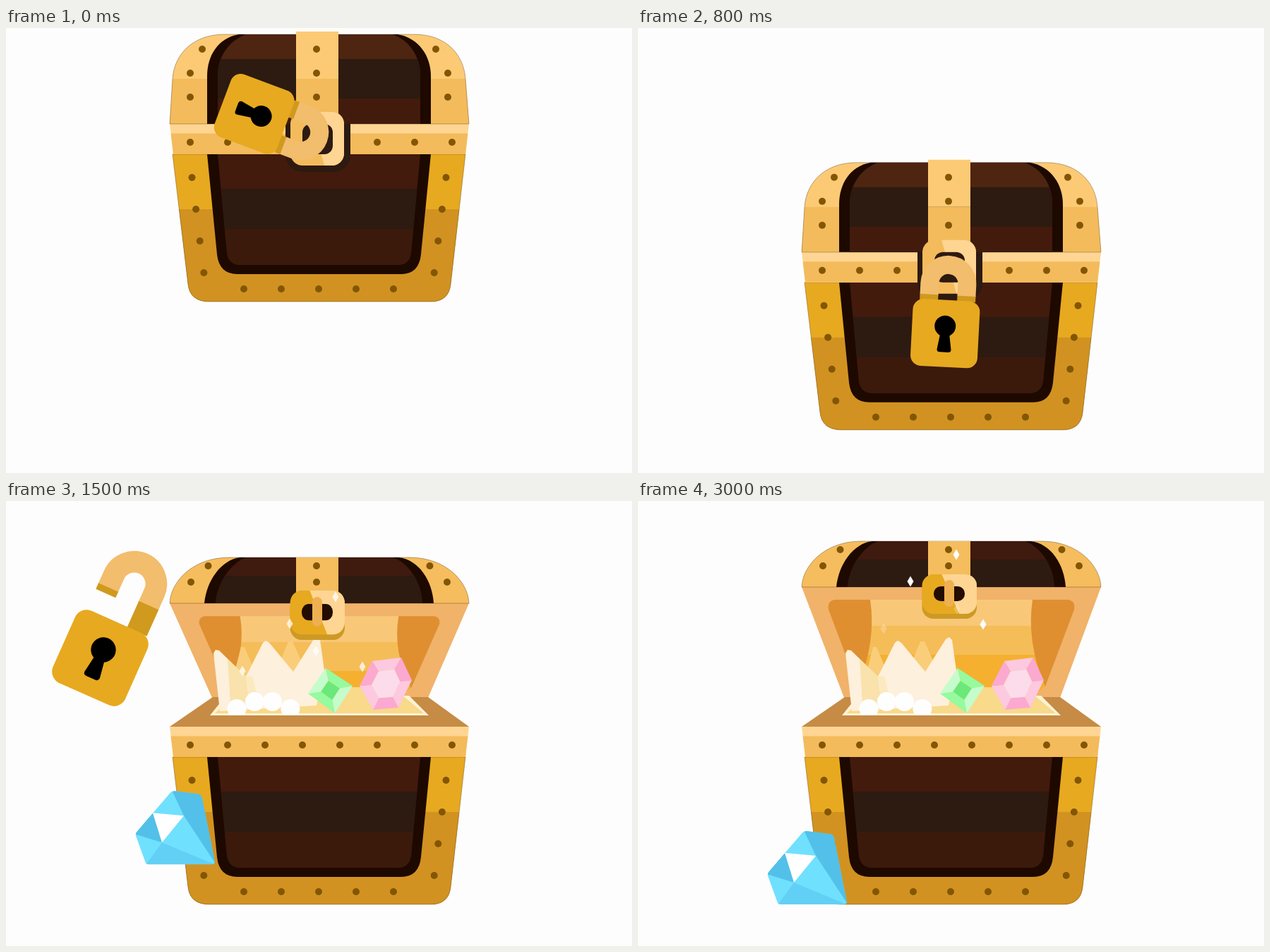
Recreate the animation shown at these times as an HTML page with a canvas. Size 887x631 px, loop 3050 ms.

```html
<!DOCTYPE html>
<html lang="en">
<head>
<meta charset="utf-8">
<title>Treasure chest</title>
<style>
html, body { margin: 0; width: 100%; height: 100%; overflow: hidden; background: #fdfdfd; }
canvas { display: block; }
</style>
</head>
<body>
<canvas id="stage" width="887" height="631"></canvas>
<script>
const ctx = document.getElementById('stage').getContext('2d');
const LOOP = 3050, STEP = 50, OPEN = 1100, FLOOR = 572;
const { PI, sin, cos, exp, min, max } = Math;

const C = {
  pale: '#fed592', light: '#fcca75', mid: '#f3bb5b', gold: '#e7a91f', deep: '#d19221',
  rivet: '#835604', frame: '#1e0900', woodTop: '#4d2511', woodDark: '#2d1a10',
  wood: '#421b0d', woodLow: '#3b1a0c', sky: '#70e0ff', blue: '#52c0e8'
};

// Motion helpers: progress from 0 to 1, and the distance left by an ease-out.
const clamp = v => max(0, min(1, v));
const progress = (t, from, to) => clamp((t - from) / (to - from));
const left = (t, from, to, power) => (1 - progress(t, from, to)) ** power;

const P = d => new Path2D(d);
const shapes = {
  lid: P('M232 0L236-64C238-96 262-127 310-127H578C626-127 649-96 651-64L656 0Z'),
  lidFrame: P('M285 0V-68C285-96 300-122 330-127H555C585-122 602-96 602-68V0Z'),
  lidWood: P('M300 0V-68C300-96 316-118 340-127H548C572-118 587-96 587-68V0Z'),
  rim: P('M232 0H656L651 43H237Z'),
  body: P('M236 43L258 228Q261 252 288 252H602Q627 252 630 228L651 43Z'),
  bodyFrame: P('M285 43L299 185Q302 213 328 213H560Q585 213 588 185L602 43Z'),
  bodyWood: P('M300 43L313 182Q315 200 333 200H554Q572 200 574 182L587 43Z'),
  openLid: P('M232 65C233 35 264 0 316 0H572C624 0 655 35 656 65Z'),
  openFrame: P('M281 65C284 33 305 3 332 0H556C585 3 604 33 606 65Z'),
  openWood: P('M297 65C299 35 320 7 340 0H548C570 7 589 35 590 65Z'),
  cavity: P('M328 278L311 262L329 140H559L577 262L560 278Z'),
  panel: P('M329 140H278Q268 142 270 154L311 263Q338 200 329 140Z'),
  slot: P('M-6 8H6L10 33Q10 37 6 37H-6Q-10 37-10 33Z'),
  diamond: P('M239 468L272 472Q277 473 278 478L296 568Q296 572 292 572H202Q198 572 197 568L184 532Q183 528 186 525L233 470Q235 468 239 468Z')
};

function fill(path, color) {
  ctx.fillStyle = color;
  ctx.fill(path);
}

function edge(path) {
  ctx.strokeStyle = 'rgba(60,35,0,.5)';
  ctx.lineWidth = .7;
  ctx.stroke(path);
}

function round(x, y, w, h, r) {
  const path = new Path2D();
  path.roundRect(x, y, w, h, r);
  return path;
}

const box = (x, y, w, h, color, r = 0) => fill(round(x, y, w, h, r), color);

function dot(x, y, r, color) {
  ctx.fillStyle = color;
  ctx.beginPath();
  ctx.arc(x, y, r, 0, 7);
  ctx.fill();
}

function poly(color, ...pts) {
  ctx.fillStyle = color;
  ctx.beginPath();
  for (let i = 0; i < pts.length; i += 2) ctx.lineTo(pts[i], pts[i + 1]);
  ctx.closePath();
  ctx.fill();
}

function group(draw) {
  ctx.save();
  draw();
  ctx.restore();
}

// Horizontal bands inside a path: top edge and colour pairs.
function bands(path, end, ...list) {
  group(() => {
    ctx.clip(path);
    list.forEach(([y, color]) => box(0, y, 887, end - y, color));
  });
}

const rivet = (x, y) => dot(x, y, 5, C.rivet);

function rivetPair(x, y) {
  rivet(x, y);
  rivet(887 - x, y);
}

function base(rimY, squash) {
  group(() => {
    ctx.translate(0, rimY);
    ctx.scale(1, squash);
    bands(shapes.body, 253, [42, C.gold], [121, C.deep]);
    edge(shapes.body);
    fill(shapes.bodyFrame, C.frame);
    bands(shapes.bodyWood, 201, [42, C.wood], [92, C.woodDark], [149, C.woodLow]);
    bands(shapes.rim, 43, [0, C.pale], [13.5, C.mid]);
    for (let i = 0; i < 4; i++) rivetPair(263.5 + i * 5.6, 76 + i * 45);
    for (let i = 0; i < 8; i++) rivet(261 + i * 53, 26);
    for (let i = 0; i < 5; i++) rivet(337 + i * 53, 234);
  });
}

function closedLid(y) {
  group(() => {
    ctx.translate(0, y);
    bands(shapes.lid, 0, [-127, C.light], [-64, C.mid]);
    edge(shapes.lid);
    fill(shapes.lidFrame, C.frame);
    bands(shapes.lidWood, 0, [-127, C.woodTop], [-92, C.woodDark], [-36, C.wood]);
    box(411, -131, 60, 67, C.light);
    box(411, -64, 60, 50, C.mid);
    for (let i = 0; i < 3; i++) {
      rivetPair(i ? 261 : 278, i * 34 - 106);
      rivet(440, i * 34 - 106);
    }
    box(396, 0, 92, 68, C.woodDark, [0, 0, 24, 24]);
    group(() => {
      ctx.clip(round(403, -17, 76, 76, 17));
      box(400, -20, 85, 85, C.mid);
      poly(C.pale, 430, -18, 482, -18, 482, 62, 452, 62);
    });
    box(420, 0, 43, 43, C.woodDark, 12);
  });
}

function lidInside(bot) {
  poly('#f1b26a', 232, bot, 656, bot, 598, 279, 292, 279);
  const k = max(.01, (259 - bot) / 137), narrow = 1 - (bot - 122) / 1000;
  group(() => {
    ctx.translate(444, 278);
    ctx.scale(narrow, k);
    ctx.translate(-444, -278);
    group(() => {
      ctx.clip(shapes.cavity);
      ctx.translate(0, 278);
      ctx.scale(1, 1 / k);
      ctx.translate(0, bot - 400);
      box(280, 138, 330, 40, '#f8c878');
      box(280, 177, 330, 42, '#f5bd58');
      box(280, 218, 330, 80, '#f5b030');
    });
    fill(shapes.panel, '#df8f30');
    ctx.translate(888, 0);
    ctx.scale(-1, 1);
    fill(shapes.panel, '#df8f30');
  });
}

function openLid(top, bot) {
  group(() => {
    ctx.translate(0, top);
    ctx.scale(1, (bot - top) / 65);
    fill(shapes.openLid, '#f5bd5d');
    edge(shapes.openLid);
    fill(shapes.openFrame, C.frame);
    bands(shapes.openWood, 65, [0, '#3f1a0f'], [26, C.woodDark]);
    box(411, 0, 60, 65, '#f5bd5d');
    for (const y of [12, 35]) {
      rivetPair(y < 20 ? 286.5 : 262, y);
      rivet(440, y);
    }
  });
  // The hasp shortens as the lid tips back.
  group(() => {
    ctx.translate(0, bot - 18);
    ctx.scale(1, 1 + min(.2, (bot - 122) * .0048));
    box(402.5, 8, 77.5, 55, '#cc9a25', 16);
    const plate = round(402.5, 0, 77.5, 56, 16);
    fill(plate, C.gold);
    group(() => {
      ctx.clip(plate);
      poly(C.pale, 430, -1, 482, -1, 482, 58, 456, 58);
    });
    box(419, 17, 44, 21, '#230c00', 10);
    box(434, 8, 14, 38, '#efb052', 7);
  });
}

// Cut stone: the core is the outline shrunk about its middle.
function gem(outer, shrink, tones, core) {
  const n = outer.length;
  const mid = [0, 1].map(k => outer.filter((_, i) => i % 2 === k).reduce((a, b) => a + b) / (n / 2));
  const inner = outer.map((v, i) => mid[i % 2] + (v - mid[i % 2]) * shrink);
  for (let i = 0; i < n; i += 2) {
    const j = (i + 2) % n;
    poly(tones[i / 2 % 2], outer[i], outer[i + 1], outer[j], outer[j + 1],
      inner[j], inner[j + 1], inner[i], inner[i + 1]);
  }
  poly(core, ...inner);
}

function treasure() {
  poly('#c68b45', 232, 320, 293, 278, 598, 278, 656, 320);
  poly('#fff3d6', 289, 304, 310, 278, 571, 276, 599, 304);
  poly('#f9d98a', 296, 301, 325, 272, 480, 264, 548, 264, 592, 301);

  poly('#f9cd7a', 322, 250, 333, 207, 338, 207, 356, 250);
  poly('#f9cd7a', 382, 244, 400, 199, 406, 199, 426, 244);
  poly('#fdf0dc', 294, 216, 297, 211, 302, 212, 340, 249, 364, 201, 368, 198, 373, 201,
    407, 242, 436, 196, 441, 193, 445, 197, 451, 240, 440, 290, 303, 298);
  poly('#f9e2ab', 314, 224, 340, 249, 345, 290, 318, 285);
  poly('#fbe9c0', 340, 249, 349, 248, 358, 285, 345, 285);
  group(() => {
    ctx.clip(round(290, 250, 160, 53.5, 0));
    for (let i = 0; i < 4; i++) dot(327 + i * 25.3, 284.5 + (i % 3 ? 0 : 10), 13.5, '#fefefe');
  });

  gem([453, 237, 491, 262, 466, 301, 428, 273], .42, ['#96fa9e', '#c5fccb'], '#6be87a');
  gem([519, 227, 560, 222, 575, 254, 556, 293, 520, 296, 501, 262], .55,
    ['#fdc9e0', '#fba9d0'], '#fcdcea');
}

function diamond(t) {
  group(() => {
    ctx.globalAlpha = progress(t, 1250, 1350);
    ctx.translate(0, -117 * left(t, 1250, 2075, 2));
    ctx.clip(shapes.diamond);
    fill(shapes.diamond, C.sky);
    poly(C.blue, 182, 529, 236, 466, 208, 499);
    poly(C.blue, 182, 529, 208, 499, 221, 541);
    poly('#62d0f4', 221, 541, 197, 574, 298, 573);
    poly(C.blue, 252, 503, 279, 470, 298, 573);
    poly(C.blue, 235, 467, 279, 471, 252, 503);
    poly('#fff', 208, 499, 252, 503, 221, 541);
  });
}

// Origin is the centre of the keyhole; lift raises the shackle.
function lock(x, y, angle, scale, lift) {
  group(() => {
    ctx.translate(x, y);
    ctx.rotate(angle);
    ctx.scale(scale, scale);
    const top = -60.5 - lift;
    ctx.lineWidth = 26;
    ctx.strokeStyle = '#f2bd6c';
    ctx.beginPath();
    ctx.moveTo(-25, -43 - lift);
    ctx.arc(1.5, top, 26.5, PI, 0);
    ctx.lineTo(28, -43 - lift);
    ctx.stroke();
    box(-38, -44 - lift, 26, 8, '#cf9a1e');
    box(15, -44 - lift, 26, 8 + lift, '#cf9a1e');
    box(-47, -37, 95, 95, C.gold, 15);
    dot(0, 0, 15, '#000');
    fill(shapes.slot, '#000');
  });
}

// A damped pendulum that also slips inside the ring.
function hangingLock(t, rimY) {
  const s = t / 1000, a = 1.93 * exp(-4.2 * s) * cos(7 * s);
  lock(440 + 7.4 * a - 99 * sin(a), rimY + 6 + 4.8 * a * a + 99 * cos(a), a, 1, 0);
}

function flyingLock(t) {
  const v = (t - OPEN) / 400;
  group(() => {
    ctx.globalAlpha = 1 - progress(t, 1500, 1600);
    lock(440 - 302 * v, 446 - 235 * v - 120 * sin(PI * v), v * 24 * PI / 180,
      1 + .18 * min(1, v), 27 * min(1, v * 4));
  });
}

function sparkle(t) {
  const rise = max(0, (1700 - t) / 200);
  // Resting place and time of brightest glow; one stays lit.
  [[348, 181, 1800], [489, 175], [386, 114, 3000], [451, 76, 3000], [452, 153, 1800]]
    .forEach(([x, y, peak]) => group(() => {
      const glow = peak ? .62 + .38 * cos((t - peak) / 400 * PI) : 1;
      ctx.globalAlpha = progress(t, 1300, 1500) * (rise ? .75 : glow);
      ctx.translate(x + (peak === 1800 ? -13 : 16) * rise, y + 60 * rise);
      poly('#fff', 0, -7.5, 4.5, 0, 0, 7.5, -4.5, 0);
    }));
}

function draw(t) {
  box(0, 0, 887, 631, '#fdfdfd');
  const squash = 1 - .083 * sin(PI * progress(t, OPEN - 150, OPEN + 150));
  const rimY = FLOOR - 184 * left(t, 0, 880, 1.85) - 252 * squash;

  if (t <= OPEN) {
    base(rimY, squash);
    closedLid(rimY);
    hangingLock(t, rimY);
    return;
  }

  const bot = 122 + 219 * left(t, OPEN, 1700, 2.05);
  const top = bot - 65 - 62 * left(t, OPEN, 1400, 1);
  if (bot < 277) lidInside(bot);
  treasure();
  base(rimY, squash);
  openLid(top, bot);
  diamond(t);
  sparkle(t);
  if (t < 1600) flyingLock(t);
}

const start = performance.now();
function tick() {
  const t = (performance.now() - start) % LOOP;
  draw(Math.floor(t / STEP) * STEP);
  requestAnimationFrame(tick);
}
tick();
</script>
</body>
</html>
```
